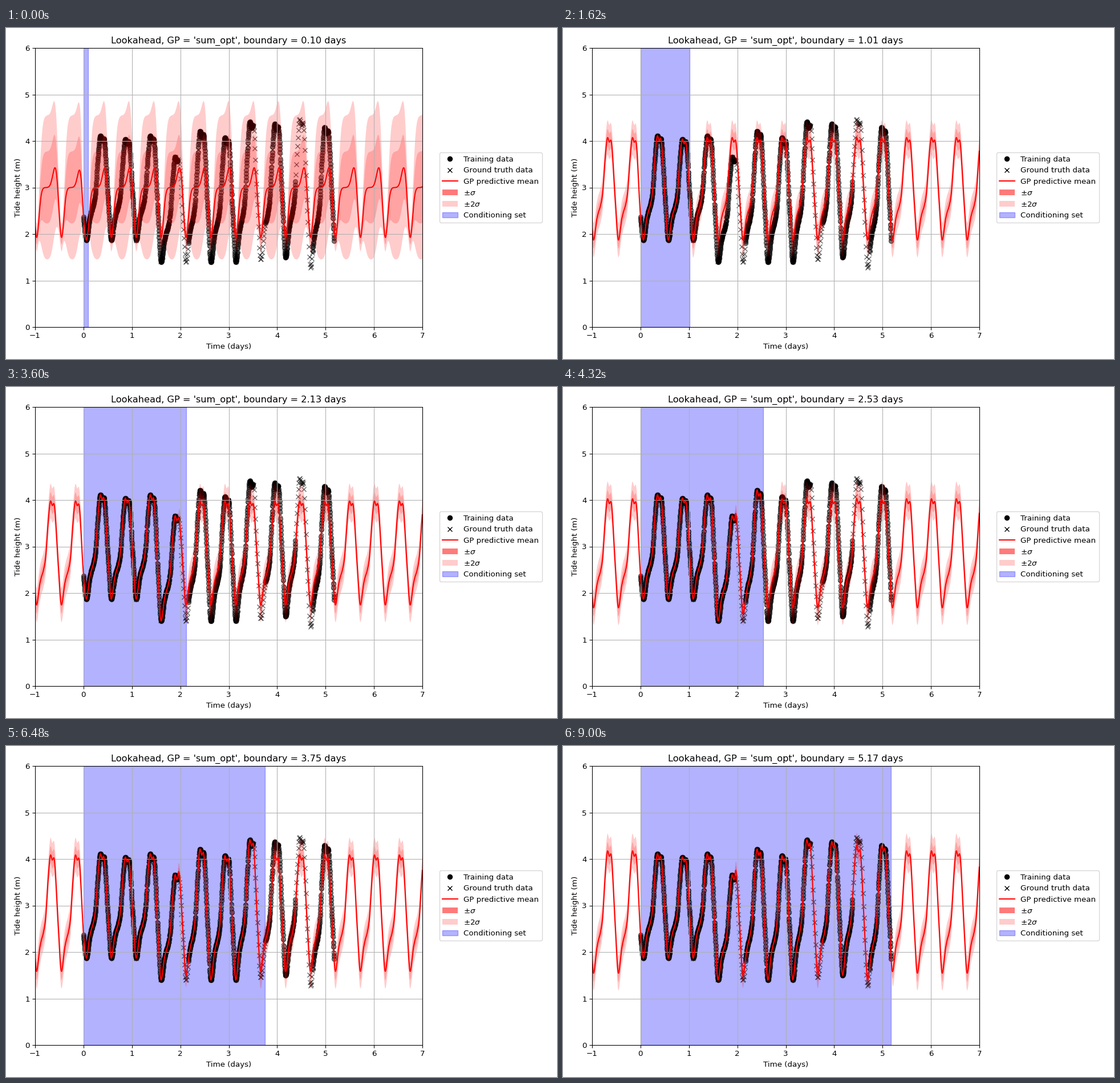
These frames come from a looping animation (966 by 580 pixels, 9090 ms). A matplotlib script:

```python
import numpy as np
import matplotlib.pyplot as plt
from matplotlib.animation import FuncAnimation
from matplotlib.lines import Line2D
from matplotlib.patches import Patch, Rectangle

W, H, DPI = 966, 580, 96.6
FRAMES, STEP = 101, 90
PERIOD, START = 0.5145, 0.059      # tidal period and first low water, in days
FIRST, LAST = 0.10, 5.17           # range of the conditioning boundary
NOISE, TIGHT = 0.185, 0.03         # deviation away from and at the data
GAPS = [(1.95, 2.165), (3.50, 3.76), (4.38, 4.73)]

# Low and high water of each tide, starting with the one already ebbing
LOW = np.array([1.87, 1.87, 1.87, 1.87, 1.4, 1.4, 1.4, 1.4, 1.45, 1.5, 1.28, 1.58])
HIGH = np.array([3.3, 4.1, 4.03, 4.1, 3.65, 4.2, 4.06, 4.4, 4.36, 4.46, 4.28])

# Shape of one tide: days since low water, fraction of its range
SHAPE = np.array([(0, 0), (.07, .21), (.1, .27), (.14, .33), (.19, .47), (.235, .77),
                  (.285, 1), (.325, .96), (.365, .97), (.445, .42), (PERIOD, 0)])


def hermite(x, kx, ky):
    """Smooth curve through the knots, flat at both ends."""
    m = np.gradient(ky, kx)
    m[0] = m[-1] = 0
    i = np.clip(np.searchsorted(kx, x, side="right") - 1, 0, len(kx) - 2)
    h = kx[i + 1] - kx[i]
    s = (x - kx[i]) / h
    return ((1 + 2 * s) * (1 - s) ** 2 * ky[i] + s * (1 - s) ** 2 * h * m[i]
            + s * s * (3 - 2 * s) * ky[i + 1] + s * s * (s - 1) * h * m[i + 1])


def bell(x, width):
    return np.exp(-(x / width) ** 2)


def tide(t, low, high, next_low):
    phase = (t - START) % PERIOD
    floor = low + (next_low - low) * np.clip((phase - 0.28) / 0.09, 0, 1)
    return floor + (high - floor) * hermite(phase, *SHAPE.T)


def sea(t):
    k = np.clip(np.floor((t - START) / PERIOD).astype(int) + 1, 0, len(HIGH) - 1)
    return tide(t, LOW[k], HIGH[k], LOW[k + 1])


def average_so_far(levels, lag, bound):
    """Mean over the tides whose turning point lies before the boundary."""
    turns = START + lag + PERIOD * np.arange(len(levels))
    weight = np.clip((bound - turns) / 0.1, 0, 1)
    weight[0] = 1
    return np.average(levels, weights=weight)


def vague(t):
    """Periodic guess when only the first low water is known."""
    d = (t - START + 0.3) % PERIOD - 0.3
    mean = 3 + 0.46 * bell(d + 0.125, 0.075) - 1.1 * bell(d, 0.07)
    return mean, np.hypot(0.15, 0.76 * (1 - bell(d, 0.09)))


def periodic(t, bound):
    """Mean and deviation away from the conditioning data."""
    low = average_so_far(LOW[1:-1], 0, bound)
    high = average_so_far(HIGH[1:], 0.25, bound)
    mean, sd = vague(t)
    unseen = np.maximum(t % PERIOD - bound, 0)
    seen = bell(unseen, 0.04) * np.clip((bound - FIRST) / 0.05, 0, 1)
    return mean + seen * (tide(t, low, high, low) - mean), sd + seen * (NOISE - sd)


def predict(t, bound):
    edge = min([bound] + [a for a, b in GAPS if a < bound < b])
    base, base_sd = periodic(t, bound)
    fit, fit_sd = sea(t), np.full_like(t, TIGHT)
    for a, b in GAPS:
        loose = np.sqrt(np.abs(np.sin(np.pi * np.clip((t - a) / (b - a), 0, 1))))
        fit += 0.7 * loose * (base - fit)
        fit_sd += 0.12 * loose

    # Outside the data the fit fades into the periodic part
    near = np.clip(t, 0, edge)
    dist = np.abs(t - near)
    offset = np.interp(near, t, fit - base)
    mean = base + offset * bell(dist, 0.06)
    sd = np.where(dist == 0, fit_sd, base_sd + (TIGHT - base_sd) * bell(dist, 0.03))
    return mean, sd


def band(t, mean, half):
    return [np.column_stack([np.r_[t, t[::-1]],
                             np.r_[mean + half, (mean - half)[::-1]]])]


# Tide readings every five minutes
rng = np.random.default_rng(4)
times = np.arange(0, 5.18, 1 / 288)
heights = sea(times)
in_gap = np.any([(times > a) & (times < b) for a, b in GAPS], axis=0)
dropped = rng.random(len(times)) < 0.06
train = ~in_gap & ~dropped
check = np.where(in_gap, np.arange(len(times)) % 3 == 0, dropped)

fig = plt.figure(figsize=(W / DPI, H / DPI), dpi=DPI)
ax = fig.add_axes([51 / W, 56 / H, 679 / W, 489 / H])
ax.set_xlim(-1, 7)
ax.set_ylim(0, 6)
ax.set_xlabel("Time (days)")
ax.set_ylabel("Tide height (m)")
ax.grid(True)
title = ax.set_title("")

span = ax.add_patch(Rectangle((0, 0), FIRST, 6, color="blue", alpha=0.3, zorder=0.9))
ax.scatter(times[train], heights[train], s=36, c="black", alpha=0.5)
ax.scatter(times[check], heights[check], s=36, c="black", marker="x",
           linewidths=1, alpha=0.6)

grid_t = np.linspace(-1, 7, 1601)
outer, inner = [ax.fill_between(grid_t, 3, 3, facecolor="red", alpha=0.2, linewidth=0)
                for _ in range(2)]
mean_line, = ax.plot([], [], color="red", lw=1.5)

handles = [
    Line2D([], [], color="black", marker="o", ls="", label="Training data"),
    Line2D([], [], color="black", marker="x", ls="", label="Ground truth data"),
    Line2D([], [], color="red", lw=1.5, label="GP predictive mean"),
    Patch(facecolor="red", alpha=0.52, lw=0, label=r"$\pm \sigma$"),
    Patch(facecolor="red", alpha=0.2, lw=0, label=r"$\pm 2\sigma$"),
    Patch(color="blue", alpha=0.3, label="Conditioning set"),
]
ax.legend(handles=handles, loc="center left", borderaxespad=0,
          bbox_to_anchor=((759.5 - 51) / 679, 0.5))


def draw(i):
    bound = FIRST + (LAST - FIRST) * i / (FRAMES - 1)
    mean, sd = predict(grid_t, bound)
    title.set_text(f"Lookahead, GP = 'sum_opt', boundary = {bound:.2f} days")
    span.set_width(bound)
    outer.set_verts(band(grid_t, mean, 2 * sd))
    inner.set_verts(band(grid_t, mean, sd))
    mean_line.set_data(grid_t, mean)
    return title, span, outer, inner, mean_line


anim = FuncAnimation(fig, draw, frames=FRAMES, interval=STEP, repeat=True,
                     repeat_delay=0, blit=False)
plt.show()
```
